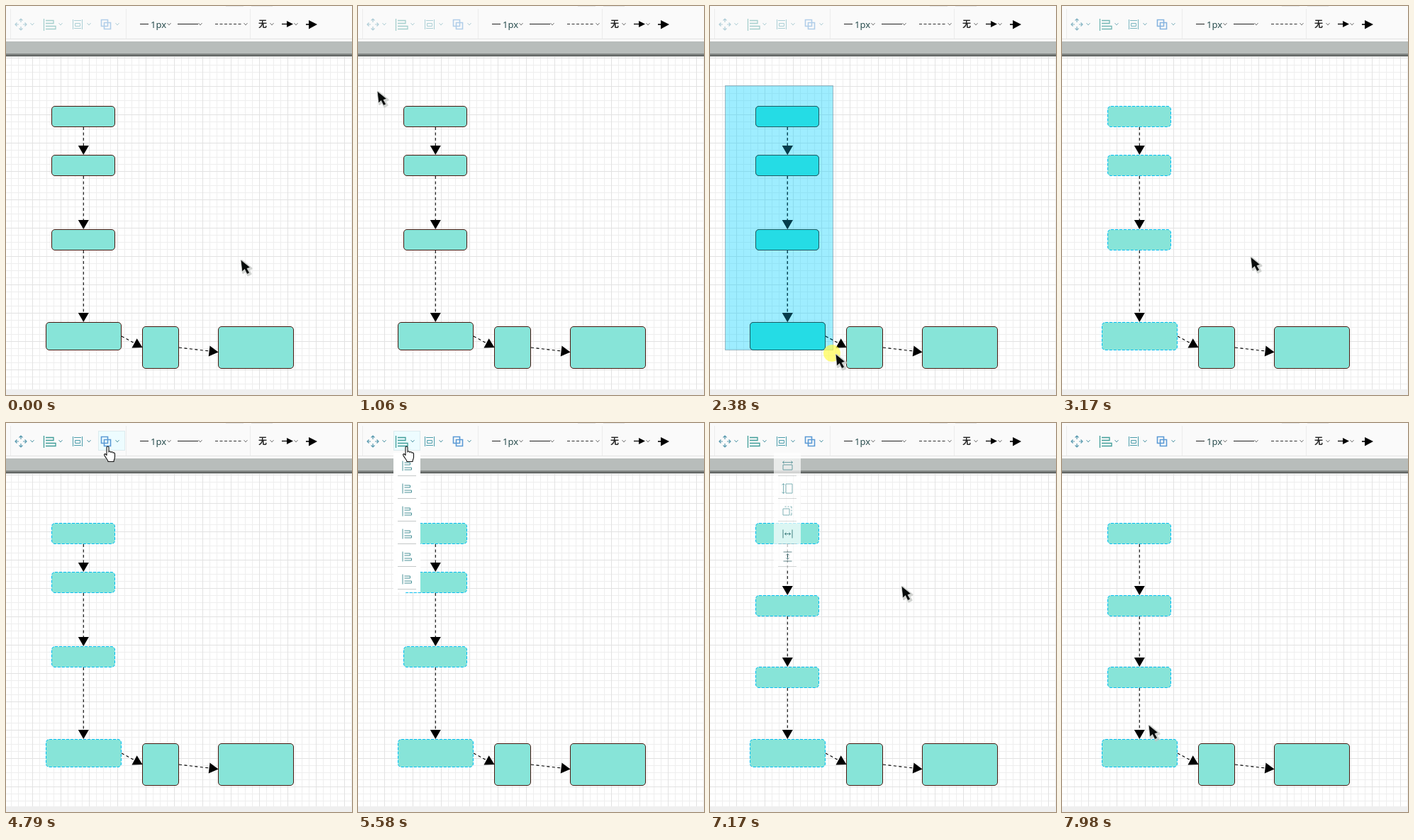
An HTML page for the animation above (8000 ms loop, 488x549 px).

```html
<!DOCTYPE html>
<html lang="zh">
<head>
<meta charset="utf-8">
<title>Distribute shapes</title>
<style>
html, body { margin: 0; width: 100%; height: 100%; overflow: hidden; background: #fff; }
svg { display: block; width: 488px; height: 549px; }
text { font-family: "Noto Sans", "Noto Sans CJK SC", "Noto Sans CJK", sans-serif; }
</style>
</head>
<body>
<svg id="stage" viewBox="0 0 488 549" xmlns="http://www.w3.org/2000/svg"></svg>
<script>
const LOOP = 8000;
const stage = document.getElementById("stage");

// time, pointer x, y, and what changes with that step
const steps = [
  [0, 331, 358, {}],
  [260, 290, 334, {}],
  [530, 98, 203, {}],
  [800, 62, 160, {}],
  [1060, 27, 120, {}],
  [1330, 110, 228, { drag: [104, 220], press: true }],
  [1590, 177, 340, { drag: [171, 332] }],
  [1860, 262, 442, { drag: [256, 434] }],
  [2120, 200, 507, { drag: [194, 499] }],
  [2380, 177, 491, { drag: [174, 486] }],
  [2640, 177, 489, {}],
  [2900, 177, 486, { press: false }],
  [3170, 266, 354, { drag: null, selected: true, icons: .72 }],
  [3440, 287, 290, { icons: .9 }],
  [3700, 287, 215, { icons: 1 }],
  [3970, 260, 149, {}],
  [4240, 215, 72, {}],
  [4520, 150, 43, {}],
  [4790, 141, 33, { look: "hand", hover: 130 }],
  [5050, 86, 33, { hover: null, menu: 130 }],
  [5320, 66, 33, { hover: 50, menu: null }],
  [5580, 66, 33, { menu: 50 }],
  [5840, 103, 33, { hover: 90, menu: null }],
  [6100, 103, 33, { menu: 90 }],
  [6370, 111, 135, { look: "arrow", hover: null, item: 2 }],
  [6630, 111, 162, { item: 3 }],
  [6900, 110, 188, { item: 4 }],
  [7170, 270, 230, { look: "dark", item: -1, spread: true, fade: .7 }],
  [7430, 257, 310, { fade: .3 }],
  [7710, 227, 386, { menu: null }],
  [7980, 122, 426, {}]
];

let last = { look: "dark", icons: .45, item: -1, fade: 1 };
const states = steps.map(([at, x, y, change]) => last = { ...last, ...change, at, x, y });

const box = (x, y, w, h, attrs) => `<rect x="${x}" y="${y}" width="${w}" height="${h}" ${attrs}/>`;
const path = (d, attrs) => `<path d="${d}" ${attrs}/>`;
const line = (d, color, more = "") => path(d, `fill="none" stroke="${color}" ${more}`);
const chevron = (x, color = "#777") => line(`M${x - 2.5} 24l2.5 3 2.5 -3`, color);

function grid() {
  let minor = "", major = "";
  for (let i = 0; i < 50; i++) {
    const x = 7.5 + i * 10, y = 73.5 + i * 10;
    const v = `M${x} 72V541`, h = y < 541 ? `M0 ${y}H488` : "";
    if (i % 4 === 3) major += v; else minor += v;
    if (i % 4 === 0) major += h; else minor += h;
  }
  return line(minor, "#eeeeee") + line(major, "#e2e2e2");
}

const alignIcon = line("M53.5 18V35M56 20.5H67V24.5H56M56 28.5H70V32.5H56", "#3f9d98", 'stroke-width="1.3"');
const spreadIcon = line("M94.5 19V33M107.5 19V33M96 20.5H106M96 31.5H106M97.5 24.5H104.5V28.5H97.5Z", "#4a9caa");
const layerIcon = line("M134.5 19.5H143.5V28.5H134.5ZM138.5 23.5H147.5V32.5H138.5Z", "#5b9ad5", 'stroke-width="1.6"');
const moveIcon = line("M21 18V23M21 29V34M13 26H18M24 26H29M18.5 20.5L21 18L23.5 20.5M18.5 31.5L21 34L23.5 31.5M15.5 23.5L13 26L15.5 28.5M26.5 23.5L29 26L26.5 28.5", "#5b9bb0", 'stroke-width="1.2"');

const backdrop = grid()
  + box(0, 541, 488, 8, 'fill="#efefef"')
  + box(0, 0, 488, 50, 'fill="#fafafa"')
  + line("M0 46.5H488", "#e4e4e4")
  + box(0, 50, 488, 18, 'fill="#b8bdbb"')
  + box(0, 67, 488, 2, 'fill="#858987"')
  + box(0, 69, 488, 2, 'fill="#626664"')
  + box(0, 71, 488, 1, 'fill="#d8dad9"')
  + line("M6.5 4V46M169.5 4V46M344.5 4V46", "#ececec")
  + line("M310 .5H335M346 .5H376", "#e6e6e6")
  + line("M189 25.5H201M242 25.5H271", "#222", 'stroke-width="1.2"')
  + line("M295 25.5H333", "#333", 'stroke-dasharray="4 2.5"')
  + '<text x="204" y="30.5" font-size="13" fill="#2b4f50">1px</text>'
  + '<text x="356" y="30" font-size="12" font-weight="700" fill="#222">无</text>'
  + [230, 274, 338, 375, 409].map(x => chevron(x)).join("")
  + line("M389 25.5H398", "#111", 'stroke-width="1.4"')
  + path("M396 21L405 25.5L396 30Z", "")
  + line("M423 26H430", "#000", 'stroke-width="1.6"')
  + path("M427 20L439 26L427 32.5Z", "");

function toolbar(s) {
  const hover = s.hover ? box(s.hover + .5, 11.5, 37, 27, 'fill="#edfcff" stroke="#dcebee"') : "";
  return hover + `<g opacity="${s.icons}">` + moveIcon + alignIcon + spreadIcon + layerIcon
    + [37, 77, 117, 157].map(x => chevron(x, "#5599a8")).join("") + "</g>";
}

function shapes(s) {
  const y2 = s.spread ? 243 : 210, y3 = s.spread ? 344 : 315;
  return [[64, 141, 89, 29], [64, y2, 89, 29], [64, y3, 89, 29],
    [56, 446, 106, 39], [192, 452, 51, 59], [299, 452, 106, 59]];
}

function drawShapes(list, s, fill, edge) {
  return list.map(([x, y, w, h], i) => {
    const picked = s.selected && i < 4;
    const stroke = picked ? 'stroke="#00bdf2" stroke-dasharray="4 2"' : `stroke="${edge}"`;
    return box(x + .5, y + .5, w, h, `rx="4.5" fill="${fill}" ${stroke}`);
  }).join("");
}

function connector(x1, y1, x2, y2, color) {
  const angle = Math.atan2(y2 - y1, x2 - x1) * 180 / Math.PI;
  const len = Math.hypot(x2 - x1, y2 - y1);
  return `<g transform="translate(${x1} ${y1}) rotate(${angle})">`
    + line(`M0 0H${len - 12}`, color, 'stroke-width="1.1" stroke-dasharray="4 3.5"')
    + path(`M${len} 0L${len - 13} -7.5V7.5Z`, `fill="${color}"`) + "</g>";
}

function connectors(list, color) {
  let out = "";
  for (let i = 0; i < 3; i++) {
    out += connector(109.3, list[i][1] + 30, 109.3, list[i + 1][1], color);
  }
  return out + connector(163, 466, 192.5, 482, color) + connector(244, 482, 299.5, 488.5, color);
}

function selection(s, list) {
  if (!s.drag) return "";
  const w = s.drag[0] - 21, h = s.drag[1] - 112;
  return `<clipPath id="area">${box(21, 112, w, h, "")}</clipPath>`
    + box(21.5, 112.5, w - 1, h - 1, 'fill="#00cfff" fill-opacity=".38" stroke="#7f9ca8" stroke-opacity=".7"')
    + '<g clip-path="url(#area)">' + drawShapes(list, s, "#25dce5", "#205b62")
    + connectors(list, "#063d4c") + "</g>";
}

// small glyphs centred on 0,0
const glyphs = [
  "M-6.5 -1.5H6.5V5.5H-6.5ZM-7 -5H7M-5 -7L-7 -5L-5 -3M5 -7L7 -5L5 -3",
  "M-2.5 -6.5H6.5V6.5H-2.5ZM-6 -7V7M-8 -5L-6 -7L-4 -5M-8 5L-6 7L-4 5",
  "M-6.5 -3.5H2.5V5.5H-6.5ZM-4 -6.5H-2M0 -6.5H2M4 -6.5H5.5V-4M5.5 -2V0M5.5 2V5.5H4",
  "M-6.5 -6V6M6.5 -6V6M-4 0H4M-2 -2L-4 0L-2 2M2 -2L4 0L2 2",
  "M-6 -6.5H6M-6 6.5H6M0 -4V4M-2 -2L0 -4L2 -2M-2 2L0 4L2 2"
];
const bars = "M-6.5 -7V7M-4 -4.5H4V-1.5H-4M-4 2.5H6V5.5H-4";
const layers = "M-5.5 -5.5H2.5V2.5H-5.5ZM-1.5 -1.5H5.5V5.5H-1.5Z";

function menu(s) {
  if (!s.menu) return "";
  const count = { 50: 6, 90: 5, 130: 4 }[s.menu];
  const cx = s.menu + 19;
  let out = box(s.menu, 42, 38, count * 32 + 5, 'fill="#fff"');
  for (let i = 0; i < count; i++) {
    const cy = 60 + i * 32;
    if (i === s.item) out += box(cx - 13, cy - 14, 27, 28, 'fill="#e9faff"');
    const d = s.menu === 90 ? glyphs[i] : s.menu === 50 ? bars : layers;
    const color = s.menu === 90 && i > 2 ? "#285b60" : "#4a9298";
    out += `<g transform="translate(${cx + .5} ${cy + .5})">${line(d, color)}</g>`
      + line(`M${cx - 13} ${cy + 14.5}H${cx + 13}`, "#c4c8c8");
  }
  return `<g opacity="${s.fade}">${out}</g>`;
}

const fat = "M0 0L2 17L5.5 13.5L9 20.5L12.5 18.5L9 12.5L13.5 11Z";
const thin = "M.5 .5V16.5L4 13L6.5 19L9.5 17.7L7 12H11.5Z";
const hand = "M1 1.5C1 -.5 4 -.5 4 1.5V8C4.5 6.5 7 6.8 7 8.5C7.6 7.2 10 7.7 10 9.3C10.7 8.3 12.5 9 12.5 10.5V15C12.5 18 11 18.5 11 21.5H3C3 19 0 17 -2 13C-3.5 10.5 -1 9.5 1 12.5Z";

function pointer(s) {
  const ink = 'fill="#fff" stroke="#111" stroke-width="1.1" stroke-linejoin="round"';
  let out;
  if (s.look === "hand") out = path(hand, ink);
  else if (s.look === "arrow") out = path(thin, ink);
  else out = path(fat, 'transform="translate(1.5 1.5)" fill="#b9bcb9" stroke="#c3c6c3" stroke-width="3" stroke-linejoin="round" opacity=".75"')
    + path(fat, 'fill="#080b0b" stroke="#e4e7e4" stroke-width=".7"');
  const spot = s.press ? '<circle cx="-5" cy="-1" r="12" fill="#fffb45" fill-opacity=".68"/>' : "";
  return `<g transform="translate(${s.x} ${s.y})">${spot}${out}</g>`;
}

function scene(s) {
  const list = shapes(s);
  return backdrop + toolbar(s)
    + drawShapes(list, s, "#87e4d8", "#48180f") + connectors(list, "#000")
    + selection(s, list) + menu(s) + pointer(s);
}

let shown = null;
const start = performance.now();
function tick() {
  const t = (performance.now() - start) % LOOP;
  const now = states.filter(s => s.at <= t).pop() || states[0];
  if (now !== shown) stage.innerHTML = scene(shown = now);
  requestAnimationFrame(tick);
}
tick();
</script>
</body>
</html>
```
